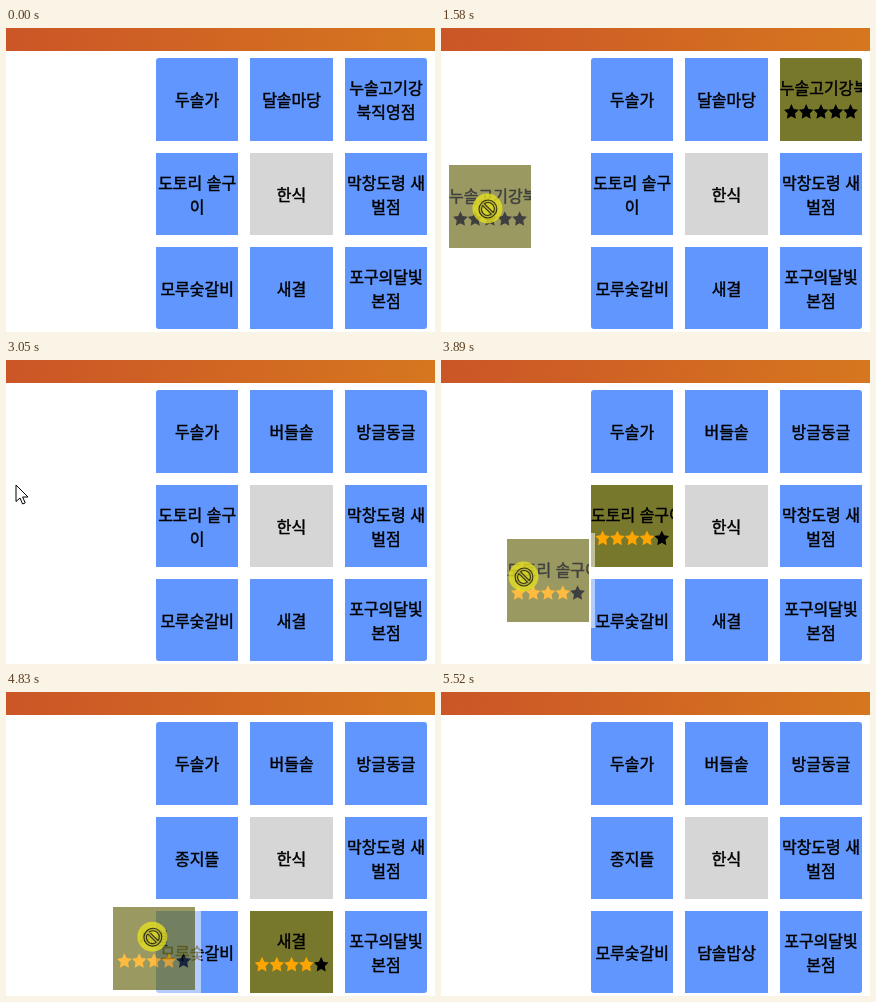
An HTML page for the animation above (5.9 s loop, 429x304 px).

```html
<!DOCTYPE html>
<html lang="ko">
<head>
<meta charset="utf-8">
<style>
html, body { margin: 0; width: 100%; height: 100%; overflow: hidden; background: #fff; }
#stage {
  position: relative; width: 429px; height: 304px; overflow: hidden;
  font: 500 16px/24px "Noto Sans CJK KR", "Noto Sans KR", "Noto Sans CJK JP", sans-serif;
  -webkit-text-stroke: .45px #000;
}
header { height: 23px; background: linear-gradient(100deg, #cb5527, #d6771f); }
#board {
  position: absolute; left: 150px; top: 30.2px; display: grid; gap: 12px;
  grid: repeat(3, 82.4px) / repeat(3, 82.4px); border-radius: 3px; overflow: hidden;
}
.cell {
  overflow: hidden; display: flex; flex-direction: column; justify-content: center;
  text-align: center; background: #6096fd;
}
.cell.center { background: #d6d6d6; }
.cell.open { white-space: nowrap; }
.cell.held { background: #78782d; }
.stars { display: none; height: 24px; justify-content: center; align-items: center; }
.open .stars { display: flex; }
.stars i {
  width: 14.8px; height: 15.6px; margin-top: 1px; background: #000; clip-path: var(--star);
}
.stars i.on { background: #ffa500; }
#ghost {
  position: absolute; width: 82px; height: 83px; opacity: .75;
  box-shadow: 0 0 0 6px rgba(255, 255, 255, .7);
}
#pointer { position: absolute; left: 0; top: 0; overflow: visible; }
</style>
</head>
<body>
<div id="stage">
  <header></header>
  <div id="board"></div>
  <svg id="pointer" width="1" height="1">
    <defs><path id="sign" fill="none" d="M-5.3-5.3A7.5 7.5 0 1 1 5.3 5.3A7.5 7.5 0 1 1-5.3-5.3L5.3 5.3"/></defs>
    <path id="arrow" d="M0 0V16.5L4 13l2.6 6 2.6-1.1L6.6 12H12Z" fill="#fff" stroke="#000"/>
    <path id="hand" transform="translate(-6.5 -2)" fill="#fff" stroke="#000" stroke-linejoin="round"
      d="M5 2a1.8 1.8 0 0 1 3.5 0V8q1.8-.9 3 .7 1.8-.6 2.8.9 2.7-.2 2.9 2.2V16l-2 4v3.3H7V20.5L1.3 14a1.7 1.7 0 0 1 2.5-2.3L5 13ZM8.5 8v3M11.5 9v2.500"/>
    <g id="stop">
      <circle cx="-.5" cy="-.5" r="15" fill="#e2dd20" fill-opacity=".8"/>
      <use href="#sign" stroke="#33330f" stroke-width="3.600"/>
      <use href="#sign" stroke="#b5b13a" stroke-width="1.400"/>
    </g>
  </svg>
</div>
<script>
const STEP = 77, START = 34, LOOP = 5900, PITCH = 94.4, SIZE = 82.4;
const $ = id => document.getElementById(id);
const stage = $('stage'), board = $('board'), pointer = $('pointer');

const names = ['두솔가', '달솥마당', '누솔고기강북직영점', '도토리 솥구이', '한식',
  '막창도령 새벌점', '모루숯갈비', '새결', '포구의달빛 본점'];
const rating = cell => cell === 2 ? 0 : 4;

// The pointer arrives at a cell, pulls it away and drops it; times are in steps.
const rounds = [
  { cell: 2, arrive: 11, at: [389, 87], pull: 13, stop: 21, drop: [41.5, 182.5], grab: [39, 44], next: '방글동글' },
  { cell: 1, arrive: 29, at: [260, 81], pull: 33, stop: 37, drop: [10, 125], grab: [18, 51], next: '버들솥' },
  { cell: 3, arrive: 43, at: [167, 180], pull: 47, stop: 50, drop: [83, 217], grab: [17, 38], next: '종지뜰' },
  { cell: 7, arrive: 59, at: [285, 252], pull: 60, stop: 64.6, drop: [82, 242], grab: [40, 30], next: '담솔밥상' }
];
const HOLD = 2;
const entry = [388, 270], outside = [390, 330];
const keys = [
  { t: 0, p: outside }, { t: 3, p: entry }, { t: 5, p: entry },
  ...rounds.flatMap(r => [
    { t: r.arrive, p: r.at }, { t: r.pull, p: r.at },
    { t: r.stop, p: r.drop }, { t: r.stop + HOLD, p: r.drop }
  ]),
  { t: 71, p: outside }, { t: 99, p: outside }
];

function starShape() {
  const points = Array.from({ length: 10 }, (_, i) => {
    const r = i % 2 ? 26 : 52, a = i * Math.PI / 5;
    return `${50 + r * Math.sin(a)}% ${52 - r * Math.cos(a)}%`;
  });
  return `polygon(${points})`;
}

function makeCell() {
  const el = document.createElement('div');
  el.className = 'cell';
  el.innerHTML = '<div></div><div class="stars">' + '<i></i>'.repeat(5) + '</div>';
  return el;
}

function fill(el, name, score) {
  el.firstChild.textContent = name;
  [...el.lastChild.children].forEach((star, i) => star.classList.toggle('on', i < score));
}

stage.style.setProperty('--star', starShape());
const cells = names.map(() => board.appendChild(makeCell()));
cells[4].classList.add('center');
const ghost = makeCell();
ghost.id = 'ghost';
ghost.classList.add('open', 'held');
stage.insertBefore(ghost, pointer);

function pointerAt(step) {
  const i = keys.findIndex(key => key.t > step);
  const a = keys[i - 1], b = keys[i];
  const u = (step - a.t) / (b.t - a.t);
  const eased = 1 - (1 - u) ** 2;
  return a.p.map((v, axis) => v + (b.p[axis] - v) * eased);
}

function cellAt(x, y) {
  const col = (x - 150) / PITCH, row = (y - 30) / PITCH;
  const inside = v => v >= 0 && v < 3 && v % 1 < SIZE / PITCH;
  return inside(col) && inside(row) ? Math.floor(row) * 3 + Math.floor(col) : -1;
}

function draw(step) {
  const [x, y] = pointerAt(step);
  const drag = rounds.find(r => step > r.pull && step < r.stop + HOLD);
  const active = drag ? drag.cell : cellAt(x, y);
  cells.forEach((el, i) => {
    const done = rounds.find(r => r.cell === i && step >= r.stop + HOLD);
    fill(el, done ? done.next : names[i], rating(i));
    el.classList.toggle('open', i === active && i !== 4);
    el.classList.toggle('held', !!drag && i === active);
  });
  ghost.style.display = drag ? '' : 'none';
  if (drag) {
    fill(ghost, names[active], rating(active));
    ghost.style.left = Math.round(x - drag.grab[0]) + 'px';
    ghost.style.top = Math.round(y - drag.grab[1]) + 'px';
  }
  const shape = drag ? 'stop' : active >= 0 ? 'hand' : 'arrow';
  for (const id of ['arrow', 'hand', 'stop']) $(id).style.display = id === shape ? '' : 'none';
  pointer.style.transform = `translate(${x}px, ${y}px)`;
}

let last = -1;
function tick() {
  const t = performance.now() % LOOP;
  const step = Math.max(0, Math.floor((t - START) / STEP));
  if (step !== last) draw(last = step);
  requestAnimationFrame(tick);
}
tick();
</script>
</body>
</html>
```
